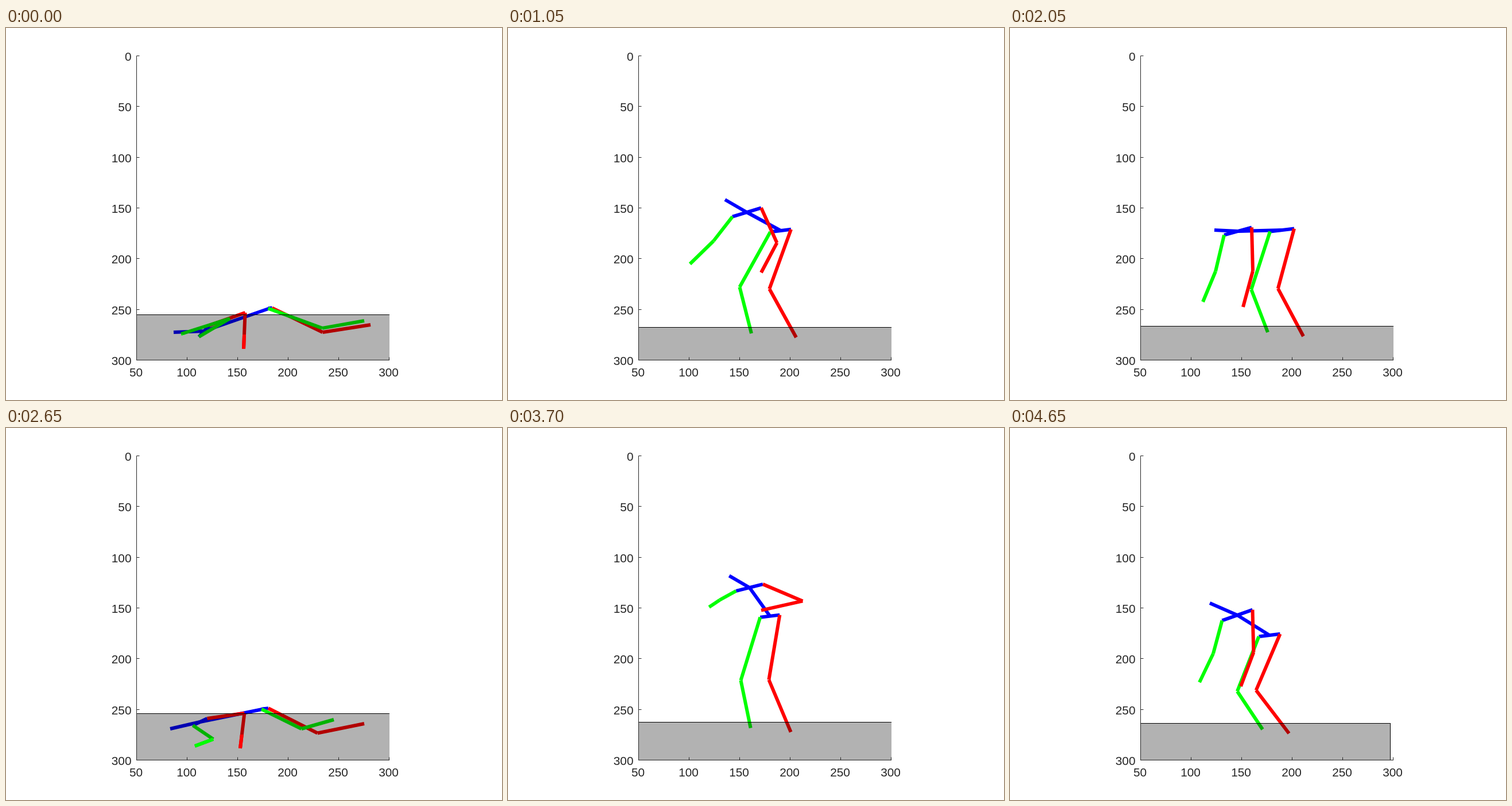
An HTML page with a canvas for the animation above (4700 ms loop, 864 by 648 pixels).

```html
<!DOCTYPE html>
<html lang="en">
<head>
<meta charset="utf-8">
<title>Stick figure burpees</title>
<style>
html, body { margin: 0; width: 100%; height: 100%; overflow: hidden; background: #fff; }
canvas { display: block; }
</style>
</head>
<body>
<canvas id="stage" width="864" height="648"></canvas>
<script>
const ctx = document.getElementById('stage').getContext('2d');
const LOOP = 4700, STEP = 50;
const LEFT = 227.5, TOP = 48.5, RIGHT = 667.5, BOTTOM = 578.5;
const GREEN = '#00ff00', RED = '#ff0000', BLUE = '#0000ff';

// Key points of the spine and the left limbs. The right side follows from
// reach (left hand to right hand) and build (shoulders, hips, stance, knee bend).
const lie = {
  head: [292, 530], neck: [345, 528], pelvis: [460, 488], elbow: [390, 506],
  hand: [305, 533], foot: [624, 510], reach: [109, 26], build: [18, 7, 11, 24]
};
const tuck = {
  head: [286, 524], neck: [338, 512], pelvis: [451, 489], elbow: [361, 542],
  hand: [329, 554], foot: [571, 508], reach: [79, 4], build: [25, 12, 53, 26]
};
const pike = {
  head: [341, 429], neck: [377, 401], pelvis: [468, 331], elbow: [345, 469],
  hand: [328, 527], foot: [462, 502], reach: [74, 22], build: [35, 32, 63, 36]
};
const crouch = {
  head: [378, 299], neck: [416, 321], pelvis: [475, 353], elbow: [358, 371],
  hand: [317, 411], foot: [424, 532], reach: [124, 15], build: [50, 36, 78, 38]
};
const air = {
  head: [400, 138], neck: [430, 156], pelvis: [419, 241], elbow: [390, 121],
  hand: [417, 78], foot: [420, 468], reach: [24, -13], build: [40, 30, 54, 3]
};
const dip = {
  head: [356, 352], neck: [397, 354], pelvis: [474, 352], elbow: [358, 424],
  hand: [336, 477], foot: [449, 530], reach: [70, 9], build: [48, 42, 62, 33]
};
const squat = {
  head: [348, 305], neck: [396, 326], pelvis: [452, 361], elbow: [354, 393],
  hand: [330, 443], foot: [440, 525], reach: [72, 7], build: [53, 37, 46, 45]
};

const mapPose = (pose, f) =>
  Object.fromEntries(Object.entries(pose).map(([key, v]) => [key, f(v, key)]));
const mix = (a, b, u) => a.map((v, i) => v + (b[i] - v) * u);
const move = (pose, dx, dy) => mapPose(pose, (v, key) =>
  key === 'reach' || key === 'build' ? v : [v[0] + dx, v[1] + dy]);

function burpee(start, rest, sink, drift) {
  const jump = move(air, drift, 0), low = move(jump, 0, 36);
  const land = { ...low, hand: [low.hand[0], 66] };
  return [
    [0, rest], [250, rest], [700, pike], [1050, crouch], [1350, low],
    [1550, jump], [1750, land], [2050, sink], [2100, sink], [2270, pike], [2500, tuck]
  ].map(([t, pose]) => [start + t, pose]);
}
const timeline = [...burpee(0, lie, dip, 14), ...burpee(2550, tuck, squat, 0)];

function poseAt(t) {
  const k = timeline.findIndex(row => row[0] > t);
  const [t0, a] = timeline[k - 1], [t1, b] = timeline[k];
  return mapPose(a, (v, key) => mix(v, b[key], (t - t0) / (t1 - t0)));
}

// Two points on either side of a centre.
const pair = ([x, y], dx, dy) => [[x - dx / 2, y - dy / 2], [x + dx / 2, y + dy / 2]];
const gap = (a, b) => Math.hypot(b[0] - a[0], b[1] - a[1]);

// A joint part of the way from a to b, pushed sideways by bend.
function joint(a, b, at, bend) {
  const [x, y] = mix(a, b, at), k = bend / gap(a, b);
  return [x - (b[1] - a[1]) * k, y + (b[0] - a[0]) * k];
}

function rightElbow(shoulder, hand) {
  const side = Math.max(-.5, Math.min(1, (hand[1] - shoulder[1]) / 35));
  return joint(shoulder, hand, .54, -.65 * side * Math.max(0, 155 - gap(shoulder, hand)));
}

function line(color, ...points) {
  ctx.strokeStyle = color;
  ctx.lineWidth = 6;
  for (let i = 1; i < points.length; i++) {
    ctx.beginPath();
    ctx.moveTo(...points[i - 1]);
    ctx.lineTo(...points[i]);
    ctx.stroke();
  }
}

function clipTo(x, y, w, h) {
  ctx.beginPath();
  ctx.rect(x, y, w, h);
  ctx.clip();
}

// The floor hangs on the feet and shades whatever is behind it.
function drawFloor(leftFoot, rightFoot) {
  const y = Math.round(leftFoot[1] - 10) - .5;
  const right = Math.round(rightFoot[0] + 176) + .5;
  ctx.fillStyle = 'rgba(0,0,0,.3)';
  ctx.fillRect(0, y, right, 88);
  ctx.strokeStyle = '#000';
  ctx.lineWidth = 1;
  ctx.strokeRect(0, y, right, 88);
}

function drawAxes() {
  ctx.strokeStyle = ctx.fillStyle = '#262626';
  ctx.lineWidth = 1;
  ctx.font = '20.8px "Liberation Sans", Arial, sans-serif';
  ctx.beginPath();
  ctx.moveTo(LEFT, TOP);
  ctx.lineTo(LEFT, BOTTOM);
  ctx.lineTo(RIGHT + .5, BOTTOM);
  ctx.textAlign = 'right';
  for (let i = 0; i <= 6; i++) {
    const y = Math.floor(TOP + i * 88.34) + .5;
    ctx.moveTo(LEFT, y);
    ctx.lineTo(LEFT + 5, y);
    ctx.fillText(i * 50, 218.5, y + 8.5);
  }
  ctx.textAlign = 'center';
  for (let i = 0; i <= 5; i++) {
    const x = Math.floor(LEFT + i * 88) + .5;
    ctx.moveTo(x, BOTTOM);
    ctx.lineTo(x, BOTTOM - 5);
    ctx.fillText(50 + i * 50, x - 1, 606.8);
  }
  ctx.stroke();
}

function draw(t) {
  const { head, neck, pelvis, elbow, hand, foot, reach, build } = poseAt(t);
  const [shoulders, hips, stance, knee] = build;
  const [lShoulder, rShoulder] = pair(neck, shoulders, -1.1 * Math.abs(shoulders - 36));
  const [lHip, rHip] = pair(pelvis, hips, -.12 * hips);
  const rHand = [hand[0] + reach[0], hand[1] + reach[1]];
  const rFoot = [foot[0] + stance, foot[1] + 7];
  const rElbow = rightElbow(rShoulder, rHand);

  ctx.fillStyle = '#fff';
  ctx.fillRect(0, 0, 864, 648);
  ctx.save();
  clipTo(228, 49, 440, 530);
  line(BLUE, lShoulder, rShoulder);
  line(BLUE, lHip, rHip);
  line(BLUE, head, neck, pelvis);
  line(RED, rHip, joint(rHip, rFoot, .54, knee * 1.12), rFoot);
  line(GREEN, lHip, joint(lHip, foot, .58, knee * .92), foot);
  line(RED, rShoulder, rElbow, rHand);
  line(GREEN, lShoulder, elbow, hand);
  drawFloor(foot, rFoot);
  // Forearms this low are in front of the floor.
  clipTo(0, 534, 864, 114);
  line(RED, rElbow, rHand);
  line(GREEN, elbow, hand);
  ctx.restore();
  drawAxes();
}

const start = performance.now();
function tick() {
  const t = (performance.now() - start) % LOOP;
  draw(t < 100 ? 0 : Math.floor(t / STEP) * STEP);
  requestAnimationFrame(tick);
}
tick();
</script>
</body>
</html>
```
